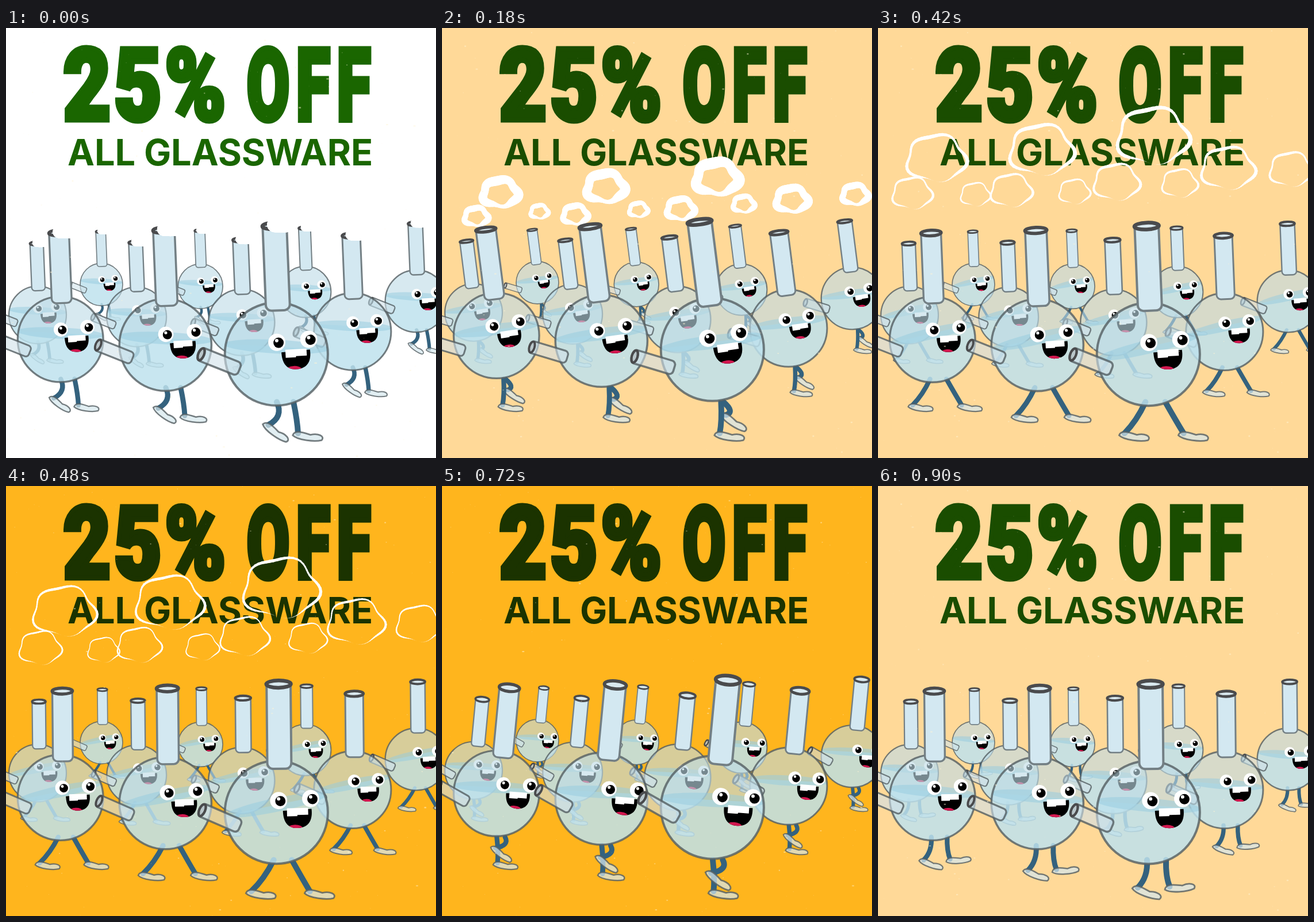
These frames come from a looping animation (748x748 px, 0.96 s). An HTML page with a canvas:

```html
<!DOCTYPE html>
<html lang="en">
<head>
<meta charset="utf-8">
<title>25% OFF all glassware</title>
<style>
  html, body { margin: 0; width: 100%; height: 100%; overflow: hidden; background: #fff; }
  canvas { display: block; }
</style>
</head>
<body>
<canvas id="stage" width="748" height="748"></canvas>
<script>
const ctx = document.getElementById('stage').getContext('2d');
const LOOP = 960, POSES = 23, POSE_MS = 40.9;
const TAU = Math.PI * 2, DEG = Math.PI / 180;

// Strobe: white, pale, full colour
const THEMES = [
  { back: '#ffffff', ink: '#1a6600' },
  { back: '#ffd998', ink: '#1a4d00' },
  { back: '#ffb51d', ink: '#1b3300' }
];

// Rows from back to front; flasks grow towards the right
const ROWS = [
  { from: 0, x: 166, y: 446, r: 37 },
  { from: 0, x: 55, y: 499, r: 50 },
  { from: 1, x: -77.5, y: 538, r: 72.5 }
];

// Oscillation over the walk cycle that peaks at the given pose
const angleFrom = (pose, peak) => TAU * (pose - peak) / POSES;
const wave = (pose, peak, times = 1) => Math.cos(times * angleFrom(pose, peak));

function shape(build, fill, stroke, width) {
  ctx.beginPath();
  build();
  if (fill) { ctx.fillStyle = fill; ctx.fill(); }
  if (stroke) { ctx.strokeStyle = stroke; ctx.lineWidth = width; ctx.stroke(); }
}
const oval = (x, y, rx, ry, fill, stroke, width) =>
  shape(() => ctx.ellipse(x, y, rx, ry, 0, 0, TAU), fill, stroke, width);

function local(draw, x = 0, y = 0, turn = 0, scale = 1) {
  ctx.save();
  ctx.translate(x, y);
  ctx.rotate(turn * DEG);
  ctx.scale(scale, scale);
  draw();
  ctx.restore();
}

const OUTLINE = 'rgba(84,94,98,.8)', GLASS = 'rgba(190,219,231,.62)', RIM = '#4a4b4d';

// The foot swings to and fro and leaves the ground on its way forward.
function drawLeg(pose, peak, middle) {
  const swing = angleFrom(pose, peak - 5.5);
  const lift = Math.max(0, Math.cos(swing));
  const push = -60 * lift * Math.sin(swing - 0.44);
  const hip = 13 + 18 * wave(pose, peak - 1);
  const x = middle + 41 * wave(pose, peak), y = 139 - 32 * lift;
  shape(() => {
    ctx.moveTo(hip, 84);
    ctx.quadraticCurveTo((hip + x) / 2 + 3 + push * 0.6, (84 + y) / 2 + 6, x, y);
  }, null, '#34627e', 10);
  local(() => shape(() => {
    ctx.moveTo(-9, 4);
    ctx.bezierCurveTo(-6, -7, 10, -2, 22, 1);
    ctx.bezierCurveTo(34, -3, 48, 1, 42, 9);
    ctx.bezierCurveTo(30, 13, 0, 12, -9, 4);
    ctx.closePath();
  }, 'rgba(214,232,238,.72)', OUTLINE, 2.8), x, y, 4 + push);
}

function drawBody(slosh) {
  oval(0, 0, 90, 90, GLASS);
  ctx.save();
  ctx.beginPath();
  ctx.arc(0, 0, 90, 0, TAU);
  ctx.clip();
  local(() => {
    ctx.fillStyle = 'rgba(190,228,240,.6)';
    ctx.fillRect(-120, 0, 240, 200);
    oval(0, 0, 92, 12, 'rgba(150,204,224,.5)');
  }, 0, -13, slosh);
  ctx.restore();
  oval(0, 0, 90, 90, null, OUTLINE, 4);
}

function drawArm() {
  shape(() => ctx.roundRect(0, -12, 72, 24, [2, 7, 7, 2]), 'rgba(208,226,234,.6)', OUTLINE, 3.6);
  oval(0, 0, 5, 11, 'rgba(215,228,232,.7)', RIM, 4.5);
}

function drawNeck(tilt) {
  shape(() => ctx.roundRect(-21, -222, 42, 146, [0, 0, 10, 10]), '#d3e8f1', '#737f84', 4);
  oval(0, -224, 21.5, 6.5 + tilt * 0.25, '#d9e9ef', RIM, 6.5);
}

function drawFace() {
  for (const side of [-1, 1]) {
    local(() => {
      oval(0, 0, 15, 15, '#fff');
      oval(3, 1, 9, 9, '#000');
      oval(0, -3, 3, 3, '#fff');
    }, 28 * side, -side);
  }
  local(() => {
    ctx.save();
    ctx.beginPath();
    ctx.moveTo(-25, -13);
    ctx.lineTo(25, -15);
    ctx.bezierCurveTo(27, 6, 18, 18, 0, 18);
    ctx.bezierCurveTo(-18, 18, -25, 6, -25, -13);
    ctx.clip();
    ctx.fillStyle = '#000';
    ctx.fillRect(-30, -20, 60, 42);
    oval(-5, 19, 14, 7, '#d3174f');
    ctx.restore();
    shape(() => {
      ctx.rect(-18, -17, 18, 14);
      ctx.rect(0, -17, 19, 12);
    }, '#fff');
  }, 4, 32);
}

// A puff that opens into a ring, rises, thins out and breaks at the bottom
function drawSmoke(pose) {
  const age = pose / 13;
  if (age >= 1) return;
  const rise = age ** 0.7, thick = 26 * (1 - age), steps = 60;
  const rx = 24 + 48 * rise - thick / 2;
  const ry = Math.max(1, 11 + 46 * Math.sqrt(age) - thick / 2);
  const point = a => {
    const lump = 1 + 0.07 * Math.sin(5 * a + 1) + 0.04 * Math.sin(3 * a);
    return [8 + rx * lump * Math.cos(a), -226 - 185 * rise + ry * lump * Math.sin(a)];
  };
  for (let i = 0; i < steps; i++) {
    const a = i / steps * TAU;
    const gap = Math.min(1, 1.8 * age) * Math.max(0, Math.sin(a)) ** 4;
    shape(() => {
      ctx.moveTo(...point(a));
      ctx.lineTo(...point(a + TAU / steps));
    }, null, '#fff', thick * (1 - gap) * (1 + 0.35 * age * Math.sin(3 * a + 1)) + 0.01);
  }
}

function drawFlask(pose) {
  const tilt = -1 - 6.5 * wave(pose, 5);
  const bounce = -3.5 - 4.5 * wave(pose, 4.8, 2);
  const slosh = -4 - 10 * wave(pose, 8.5);
  ctx.lineCap = 'round';
  drawLeg(pose, 9.5, 21);
  drawLeg(pose, 22.7, -3);
  local(() => {
    drawBody(slosh);
    local(() => {
      local(drawArm, -129 + tilt, -5, 24);
      local(() => drawNeck(tilt), 6);
      local(drawFace, 33 + 1.45 * tilt, -22, -1);
    }, 0, 0, tilt);
  }, 0, bounce);
  drawSmoke(pose);
}

function drawCrowd(pose) {
  for (const { from, x, y, r } of ROWS) {
    for (let i = from; i < 4; i++) {
      const scale = (r + 1.9 * i * i) / 90;
      local(() => drawFlask(pose), x + 167 * i + 5.2 * i * i, y + 3.2 * i * i, 0, scale);
    }
  }
}

// Letter spacing is chosen so that the line fills the given width.
function drawLine(text, font, x, baseline, width, condense = 1, weight = 0) {
  ctx.save();
  ctx.translate(x, baseline);
  ctx.scale(condense, 1);
  ctx.font = font;
  const box = ctx.measureText(text);
  const ink = box.actualBoundingBoxLeft + box.actualBoundingBoxRight + weight;
  ctx.letterSpacing = (width / condense - ink) / (text.length - 1) + 'px';
  const left = box.actualBoundingBoxLeft + weight / 2;
  ctx.fillText(text, left, 0);
  if (weight) {
    ctx.lineWidth = weight;
    ctx.miterLimit = 3;
    ctx.strokeText(text, left, 0);
  }
  ctx.restore();
}

function drawTitle(ink) {
  ctx.fillStyle = ctx.strokeStyle = ink;
  const heavy = '900 174px Roboto, sans-serif';
  drawLine('25%', heavy, 100, 160, 280, 0.82, 9);
  drawLine('OFF', heavy, 419, 160, 217, 0.62, 9);
  drawLine('ALL GLASSWARE', '700 63px Inter, sans-serif', 108, 239, 527);
}

function drawSpecks(seed) {
  const random = () => (seed = (seed * 16807) % 2147483647) / 2147483647;
  ctx.fillStyle = 'rgba(255,246,214,.5)';
  for (let i = 0; i < 170; i++) {
    const x = random() * 748, y = random() * 748, size = 0.5 + random() ** 4 * 2;
    ctx.fillRect(x, y, size * (1 + random()), size);
  }
}

function draw(pose) {
  const phase = pose % THEMES.length, theme = THEMES[phase];
  ctx.fillStyle = theme.back;
  ctx.fillRect(0, 0, 748, 748);
  drawTitle(theme.ink);
  drawCrowd(pose);
  drawSpecks(4211 + 977 * phase);
}

const begin = performance.now();
function tick() {
  const time = (performance.now() - begin) % LOOP;
  draw(Math.min(POSES - 1, Math.floor(time / POSE_MS)));
  requestAnimationFrame(tick);
}
tick();
</script>
</body>
</html>
```
